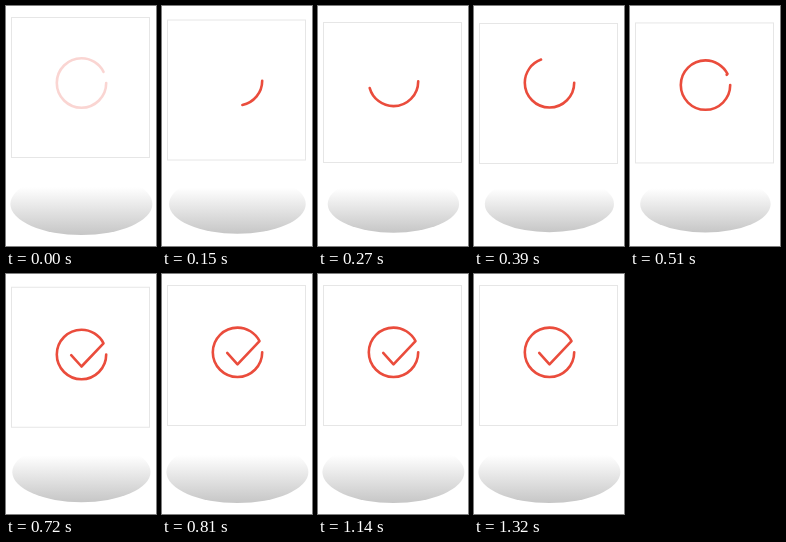
An HTML page with a canvas that plays this animation: 150 px wide and 240 px high, repeating every 1350 ms.

```html
<!DOCTYPE html>
<html lang="en">
<head>
<meta charset="utf-8">
<title>Check animation</title>
<style>
  html, body { margin: 0; width: 100%; height: 100%; overflow: hidden; background: #fff; }
  canvas { display: block; width: 150px; height: 240px; }
</style>
</head>
<body>
<canvas id="stage"></canvas>
<script>
const W = 150, H = 240, LOOP = 1350, STEP = 30;
const RED = '#ea4c3c';
const canvas = document.getElementById('stage');
const ctx = canvas.getContext('2d');
const dpr = window.devicePixelRatio || 1;
canvas.width = W * dpr;
canvas.height = H * dpr;

const RADIUS = 24.7, ARC_END = 333 * Math.PI / 180;
const ARC_LENGTH = RADIUS * ARC_END;
const TICK = [
  [RADIUS * Math.cos(ARC_END), RADIUS * Math.sin(ARC_END)],
  [0, 12],
  [-10.3, 0.6]
];

// Time and height of the ring centre
const FLOAT = [[0, 77], [150, 74.7], [390, 76.8], [510, 79.1], [660, 81.7], [810, 78.3]];

const clamp = x => Math.min(1, Math.max(0, x));

// Press depth, 0 to 1: decelerate down, accelerate back up
function press(t) {
  const down = 400, start = 55, end = 795;
  return t < down
    ? Math.sin(clamp((t - start) / (down - start)) * Math.PI / 2)
    : Math.cos(clamp((t - down) / (end - down)) * Math.PI / 2);
}

function slope(i) {
  if (i === 0 || i === FLOAT.length - 1) return 0;
  const [t0, y0] = FLOAT[i - 1], [t1, y1] = FLOAT[i], [t2, y2] = FLOAT[i + 1];
  const a = (y1 - y0) / (t1 - t0), b = (y2 - y1) / (t2 - t1);
  return a * b <= 0 ? 0 : 2 * a * b / (a + b);
}

function ringY(t) {
  const n = FLOAT.findIndex(p => p[0] > t);
  if (n < 0) return FLOAT[FLOAT.length - 1][1];
  const [t0, y0] = FLOAT[n - 1], [t1, y1] = FLOAT[n];
  const d = t1 - t0, u = (t - t0) / d, v = 1 - u;
  return y0 * (1 + 2 * u) * v * v + slope(n - 1) * d * u * v * v
       + y1 * u * u * (3 - 2 * u) - slope(n) * d * u * u * v;
}

function drawShadow(depth) {
  ctx.save();
  ctx.translate(75.4, 198);
  ctx.scale(1 - 0.09 * depth, 1 - 0.09 * depth);
  const fill = ctx.createLinearGradient(0, -17, 0, 31);
  fill.addColorStop(0, '#fff');
  fill.addColorStop(1, '#c6c6c6');
  ctx.fillStyle = fill;
  ctx.beginPath();
  ctx.ellipse(0, 0, 71, 31, 0, 0, Math.PI * 2);
  ctx.fill();
  ctx.restore();
}

function drawCard(depth) {
  ctx.strokeStyle = '#e6e6e6';
  ctx.lineWidth = 1;
  ctx.strokeRect(5.5, 11.5 + 6 * depth, 138, 140);
}

function drawMark(y, length, alpha) {
  ctx.save();
  ctx.translate(75.5, y);
  ctx.globalAlpha = alpha;
  ctx.strokeStyle = RED;
  ctx.lineWidth = 2.6;
  ctx.lineCap = ctx.lineJoin = 'round';
  ctx.beginPath();
  ctx.arc(0, 0, RADIUS, 0, Math.min(ARC_END, length / RADIUS));
  let left = length - ARC_LENGTH;
  for (let i = 1; i < TICK.length && left > 0; i++) {
    const [x0, y0] = TICK[i - 1], [x1, y1] = TICK[i];
    const size = Math.hypot(x1 - x0, y1 - y0), part = Math.min(1, left / size);
    ctx.lineTo(x0 + (x1 - x0) * part, y0 + (y1 - y0) * part);
    left -= size;
  }
  ctx.stroke();
  ctx.restore();
}

function draw(now) {
  let t = Math.floor((now % LOOP) / STEP) * STEP;
  if (t < 60) t = 0;
  const depth = press(t);
  ctx.setTransform(dpr, 0, 0, dpr, 0, 0);
  ctx.fillStyle = '#fff';
  ctx.fillRect(0, 0, W, H);
  drawShadow(depth);
  drawCard(depth);
  if (t === 0) drawMark(ringY(0), ARC_LENGTH, 0.23);
  else drawMark(ringY(t), (t - 40) * 0.308, 1);
}

let start;
function tick(now) {
  if (start === undefined) start = now;
  draw(now - start);
  requestAnimationFrame(tick);
}
draw(0);
requestAnimationFrame(tick);
</script>
</body>
</html>
```
